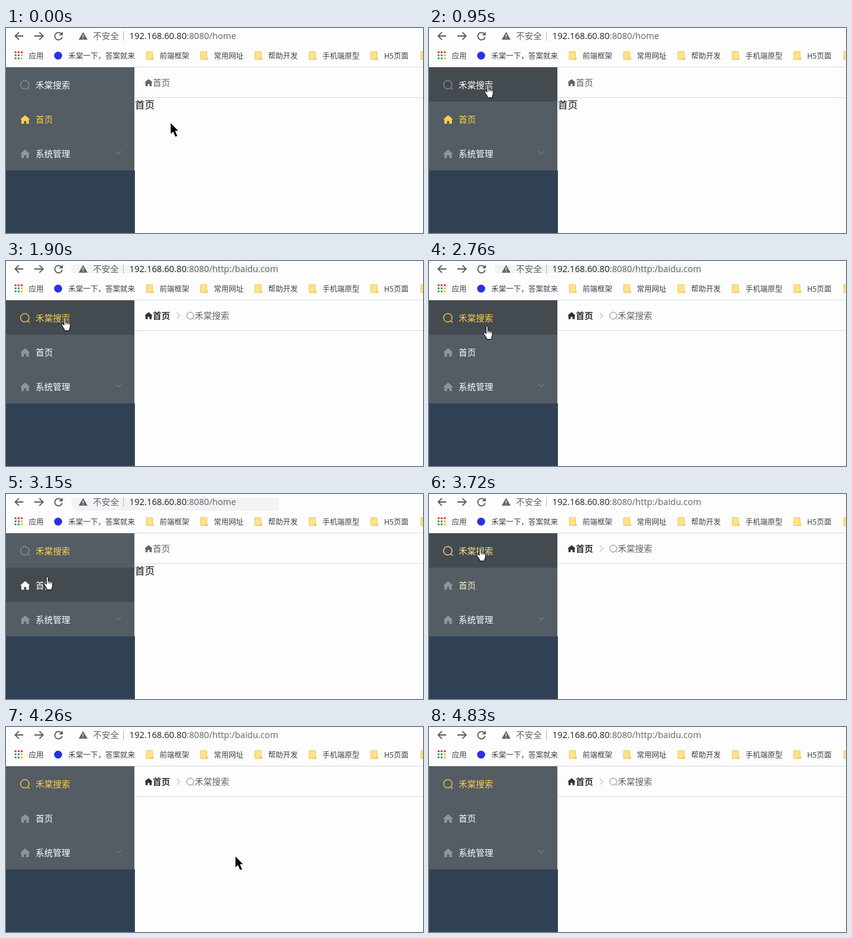
An HTML page that plays this animation: 676x334 px, repeating every 5.09 s.

```html
<!DOCTYPE html>
<html lang="zh">
<head>
<meta charset="utf-8">
<title>侧边菜单导航</title>
<style>
html, body { margin: 0; width: 100%; height: 100%; overflow: hidden; background: #fdfdfd; }
svg { display: block; width: 676px; height: 334px; }
text { font-family: "Noto Sans CJK SC", "Noto Sans CJK", sans-serif; white-space: pre; }
.url { font: 14.25px "Open Sans", "Noto Sans", sans-serif; }
.mark text { font-size: 12px; fill: #3c4043; }
.menu text, .crumb text { font-size: 14px; }
.line { fill: none; stroke: currentColor; }
</style>
</head>
<body>
<svg viewBox="0 0 676 334">
  <defs>
    <clipPath id="pillClip"><rect id="pillBox" x="0" y="6" width="442" height="21"/></clipPath>
    <path id="house" d="M7.5 0 15 6.6 13.6 7.6V14H9.3V9.6H5.7V14H1.4V7.6L0 6.6Z" fill="currentColor"/>
    <g id="lens" class="line">
      <circle cx="7.5" cy="7.5" r="6.9"/>
      <path d="M12.3 12.3 15.4 15.4"/>
    </g>
    <g id="folder">
      <path d="M.5.5H10.5V9.5L12 10.5V13.5H.5Z" fill="#ffe28c" stroke="#ebc75c"/>
      <path d="M8 13.5V11H12V13.5Z" fill="#f3cd5e"/>
    </g>
  </defs>

  <rect width="676" height="334" fill="#fdfdfd"/>

  <!-- browser bar -->
  <rect id="pill" x="106" y="-1" width="520" height="28" rx="14" fill="#f1f3f4" clip-path="url(#pillClip)"/>
  <g class="line" color="#5a5e63" stroke-width="1.8">
    <path d="M28 13H15M21 6.8 14.8 13 21 19.2"/>
    <path d="M46 13H60M54 6.8 60.2 13 54 19.2"/>
    <path d="M89.5 9.2A6 6 0 1 0 91 14.5"/>
  </g>
  <path d="M92 6V12H86Z" fill="#5a5e63"/>
  <path d="M125 6.5 132.2 19H117.8Z" fill="#5f6368"/>
  <path d="M125 10.8V14.6M125 15.8V17.3" stroke="#fdfdfd" stroke-width="1.4"/>
  <text x="141" y="18" font-size="14" fill="#5f6368">不安全</text>
  <path d="M190.5 5V21" stroke="#b4b7bb"/>
  <text class="url" x="200" y="18" fill="#5f6368"><tspan fill="#202124">192.168.60.80</tspan>:8080/<tspan id="route"></tspan></text>

  <g class="mark" id="marks">
    <text x="37" y="49.5">应用</text>
    <circle cx="84.5" cy="45" r="6.5" fill="#2932e1"/>
    <text x="101" y="49.5">禾棠一下，答案就来</text>
  </g>
  <rect y="63" width="676" height="1" fill="#d9dbde"/>

  <!-- side menu -->
  <rect y="64" width="209" height="270" fill="#304156"/>
  <rect y="64" width="208" height="168" fill="#545c64"/>
  <rect x="208" y="64" width="1" height="168" fill="#e6e6e6"/>
  <rect id="row0" y="64" width="208" height="56" fill="#434a50"/>
  <rect id="row1" y="120" width="208" height="56" fill="#434a50"/>
  <g class="menu">
    <use id="icon0" href="#lens" x="23" y="85" stroke-width="1.3"/>
    <text id="label0" x="48" y="98">禾棠搜索</text>
    <use id="icon1" href="#house" x="23.5" y="142"/>
    <text id="label1" x="48" y="154">首页</text>
    <use href="#house" x="23.5" y="198" color="#909399"/>
    <text x="48" y="210" fill="#fff">系统管理</text>
    <path class="line" color="#909399" d="M177.5 200.7 182 205.2 186.5 200.7"/>
  </g>

  <!-- page -->
  <rect x="209" y="113" width="467" height="1" fill="#d8dbe0"/>
  <g class="crumb">
    <g id="crumbHome">
      <use href="#house" transform="translate(225 83.2) scale(.82)"/>
      <text x="238" y="94" fill="currentColor">首页</text>
    </g>
    <g id="crumbSearch">
      <path class="line" color="#c0c4cc" stroke-width="1.3" d="M277 84.2 281.8 89 277 93.8"/>
      <g color="#606266">
        <use href="#lens" transform="translate(292.5 82.8) scale(.82)"/>
        <text x="306" y="94" fill="currentColor">禾棠搜索</text>
      </g>
    </g>
  </g>
  <text id="content" x="209" y="131" font-size="16" fill="#111">首页</text>

  <path id="arrow" d="M0 0V17.4L4 13.7 7.6 22 10.6 20.7 7 12.4H12.2Z"/>
  <g id="hand" fill="#fff" stroke="#000" stroke-linejoin="round">
    <path d="M4.5 2C4.5 0 7.3 0 7.3 2V7.6C7.9 6.8 9.7 7 9.8 8.3 10.4 7.5 12.1 7.8 12.2 9.1 13 8.4 14.6 8.9 14.6 10.3V14.6C14.6 17 13.2 17.6 13.2 19.6V21.5H5.2V19.6C4.6 17.5 1.4 14.4 .7 12 .5 10.4 2.3 10 3.2 11.1L4.5 12.6Z"/>
    <path d="M7.3 7.6V11M9.8 8.3V11.4M12.2 9.1V11.8" stroke-width=".9"/>
  </g>
</svg>

<script>
const LOOP = 5090;
const WHITE = [255, 255, 255], YELLOW = [255, 208, 75], GRAY = "#909399";
const $ = id => document.getElementById(id);

// Tracks hold [time, value...] and keep each value until the next time.
const arrowTrack = [[0, 267, 155], [560, 265, 155], [710, 230, 144], [830],
  [4260, 372, 211], [4410, 589, 299], [4560, 606, 314], [4680, 622, 329], [4830]];
const handTrack = [[0], [830, 108, 98], [950, 89.5, 92], [2480, 93, 92], [2610, 98.5, 93],
  [2760, 88, 106], [2880, 70, 125], [3000, 61, 133.5], [3150, 61, 134.5],
  [3420, 77, 87.5], [3990, 112, 100], [4110, 177.5, 132.5], [4260]];
const pageTrack = [[0, 0], [1630, 1], [3150, 0], [3720, 1]];
const tintTrack = [[0, 0], [1630, .1], [1750, .6], [1900, 1], [3150, .97], [3300, .4],
  [3420, 0], [3720, .68], [3870, 1]];
const hoverTracks = [
  [[0, 0], [710, .3], [830, .7], [950, 1], [2880, .6], [3000, .2], [3150, 0],
    [3420, .5], [3570, 1], [4110, .5], [4260, 0]],
  [[0, 0], [2880, .4], [3000, .8], [3150, 1], [3420, .5], [3570, 0], [4110, .4], [4260, 0]]
];

function at(track, t) {
  return track.findLast(step => step[0] <= t).slice(1);
}

function tint(p) {
  return `rgb(${WHITE.map((w, i) => Math.round(w + (YELLOW[i] - w) * p))})`;
}

function show(id, visible) {
  $(id).setAttribute("visibility", visible ? "visible" : "hidden");
}

function place(id, [x, y]) {
  show(id, x !== undefined);
  if (x !== undefined) $(id).setAttribute("transform", `translate(${x} ${y})`);
}

function addBookmarks() {
  let html = "";
  const red = "#ea4335", green = "#34a853", blue = "#4285f4", amber = "#fbbc05";
  [red, red, red, green, blue, amber, green, green, amber].forEach((color, i) => {
    html += `<rect x="${14 + i % 3 * 5}" y="${38 + Math.floor(i / 3) * 5}" width="3" height="3" fill="${color}"/>`;
  });
  let x = 227;
  for (const name of ["前端框架", "常用网址", "帮助开发", "手机端原型", "H5页面", ""]) {
    html += `<use href="#folder" x="${x}" y="38"/><text x="${x + 22}" y="49.5">${name}</text>`;
    x += 40 + (name === "H5页面" ? 41 : name.length * 12);
  }
  $("marks").insertAdjacentHTML("beforeend", html);
}

function draw(t) {
  const [page] = at(pageTrack, t), [p] = at(tintTrack, t);
  $("route").textContent = page ? "http:/baidu.com" : "home";
  show("pill", t >= 1630 && t < 3720);
  $("pillBox").setAttribute("height", t < 3150 ? 14 : 21);

  [p, 1 - p].forEach((amount, i) => {
    const active = page === 1 - i;
    $("label" + i).setAttribute("fill", tint(amount));
    $("icon" + i).setAttribute("color", active ? tint(amount) : GRAY);
    $("row" + i).setAttribute("opacity", at(hoverTracks[i], t)[0]);
  });

  $("crumbHome").setAttribute("color", page ? "#303133" : "#606266");
  $("crumbHome").setAttribute("font-weight", page ? 700 : 400);
  show("crumbSearch", page);
  show("content", !page);
  place("arrow", at(arrowTrack, t));
  place("hand", at(handTrack, t));
}

addBookmarks();
const start = performance.now();
function tick() {
  draw((performance.now() - start) % LOOP);
  requestAnimationFrame(tick);
}
tick();
</script>
</body>
</html>
```
